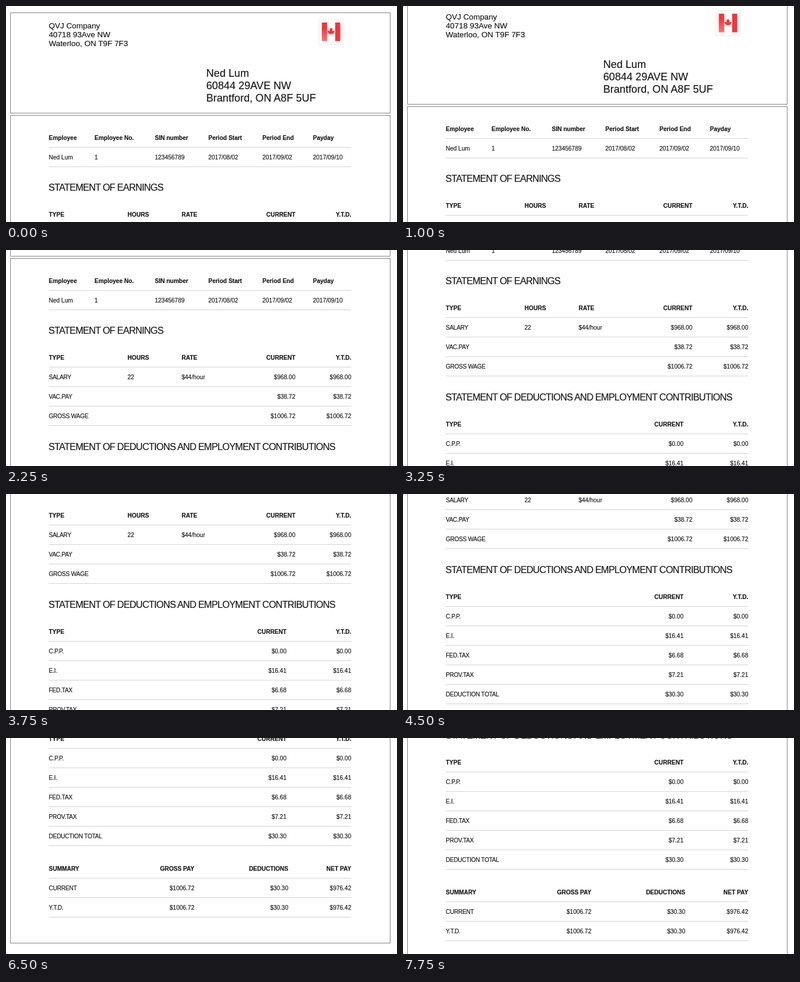
An HTML page that plays this animation: 658x366 px, repeating every 8 s.

```html
<!DOCTYPE html>
<html lang="en">
<head>
<meta charset="utf-8">
<title>Pay stub</title>
<style>
  html, body { margin: 0; width: 100%; height: 100%; overflow: hidden; background: #fff; }
  svg { display: block; width: 658px; height: 366px; }
  text {
    font: 10px "Liberation Sans", Arial, sans-serif; white-space: pre;
    fill: #151515; stroke: #151515; stroke-width: .15px;
  }
  .bold { font-weight: bold; }
  .label { letter-spacing: -.25px; }
  .title { font-size: 16px; letter-spacing: -.75px; }
  .sender { font-size: 13.25px; }
  .receiver { font-size: 17.75px; }
  .box { fill: none; stroke: #858585; }
  .rule { fill: #d4d4d4; }
  .stamp { fill: #fdfdfd; stroke: #dedede; stroke-dasharray: 2 1.5; }
  .red { fill: #f8343a; }
  .faded { fill: url(#fade); }
</style>
</head>
<body>
<svg viewBox="0 0 658 366">
  <linearGradient id="fade" x2="0" y2="1">
    <stop offset=".3" stop-color="#f8343a"/>
    <stop offset="1" stop-color="#fd7474"/>
  </linearGradient>
  <g id="page"></g>
</svg>
<script>
const page = document.getElementById('page');
const LEFT = 72, RIGHT = 581, ROW = 33;

function add(tag, attrs, content = '') {
  const node = document.createElementNS('http://www.w3.org/2000/svg', tag);
  for (const key in attrs) node.setAttribute(key, attrs[key]);
  node.textContent = content;
  page.append(node);
}

const rect = (cls, x, y, width, height) => add('rect', { class: cls, x, y, width, height });

// Negative x marks a column that is aligned to its right edge.
function text(content, x, y, cls) {
  add('text', { class: cls, x: Math.abs(x), y, 'text-anchor': x < 0 ? 'end' : 'start' }, content);
}

const lines = (list, x, y, step, cls) => list.forEach((s, i) => text(s, x, y + i * step, cls));

// y is the rule under the header row; returns the rule under the last row.
function table(y, columns, rows) {
  rows.forEach((row, r) => {
    row.forEach((cell, c) => {
      const cls = r === 0 ? 'bold' : /^[A-Z. ]+$/.test(cell) ? 'label' : '';
      text(cell, columns[c], y + r * ROW - 12, cls);
    });
    rect('rule', LEFT, y + r * ROW, RIGHT - LEFT, 1);
  });
  return y + (rows.length - 1) * ROW;
}

// A heading and its table, placed below the rule at y.
function section(title, y, columns, rows) {
  text(title, LEFT - .5, y + 41.5, 'title');
  return table(y + 97.5, columns, rows);
}

function stamp() {
  rect('stamp', 526.5, 22.5, 41, 43);
  rect('faded', 531.5, 28, 9, 31.5);
  rect('red', 554, 28, 8.5, 31.5);
  const half = [[0, -6], [2.5, -4], [2.4, -.5], [5.8, -1.2], [5.8, 1.2], [2.8, 4.4], [.4, 4.2], [.4, 6.5]];
  const mirrored = half.map(([x, y]) => [-x, y]).reverse();
  add('polygon', { class: 'red', transform: 'translate(547 43)', points: [...half, ...mirrored].join(' ') });
}

const money = value => '$' + value.toFixed(2);
const twice = value => [money(value), money(value)];

const hours = 22, rate = 44;
const salary = hours * rate, vacation = salary * .04, gross = salary + vacation;
const deductions = { 'C.P.P.': 0, 'E.I.': 16.41, 'FED.TAX': 6.68, 'PROV.TAX': 7.21 };
const deducted = Object.values(deductions).reduce((sum, value) => sum + value);
const summary = [gross, deducted, gross - deducted].map(money);

rect('box', 7.5, 11.5, 639, 170);
rect('box', 7.5, 185.5, 639, 711);
stamp();
lines(['QVJ Company', '40718 93Ave NW', 'Waterloo, ON T9F 7F3'], LEFT, 38, 15, 'sender');
lines(['Ned Lum', '60844 29AVE NW', 'Brantford, ON A8F 5UF'], 337, 120, 21, 'receiver');

let y = table(239, [LEFT, 149, 250.5, 340.5, 431.5, 516.5], [
  ['Employee', 'Employee No.', 'SIN number', 'Period Start', 'Period End', 'Payday'],
  ['Ned Lum', '1', '123456789', '2017/08/02', '2017/09/02', '2017/09/10'],
]);

y = section('STATEMENT OF EARNINGS', y - .5, [LEFT, 204.5, 295.5, -487, -RIGHT], [
  ['TYPE', 'HOURS', 'RATE', 'CURRENT', 'Y.T.D.'],
  ['SALARY', hours, `$${rate}/hour`, ...twice(salary)],
  ['VAC.PAY', '', '', ...twice(vacation)],
  ['GROSS WAGE', '', '', ...twice(gross)],
]);

y = section('STATEMENT OF DEDUCTIONS AND EMPLOYMENT CONTRIBUTIONS', y + .5, [LEFT, -472, -RIGHT], [
  ['TYPE', 'CURRENT', 'Y.T.D.'],
  ...Object.entries(deductions).map(([name, value]) => [name, ...twice(value)]),
  ['DEDUCTION TOTAL', ...twice(deducted)],
]);

table(y + 55, [LEFT, -317, -475, -RIGHT], [
  ['SUMMARY', 'GROSS PAY', 'DEDUCTIONS', 'NET PAY'],
  ['CURRENT', ...summary],
  ['Y.T.D.', ...summary],
]);

// Steady scroll gestures: start ms, end ms, distance in px.
const LOOP = 8000, STEP = 250;
const glides = [
  [880, 2480, 200],
  [2810, 3940, 141],
  [4250, 4500, 35],
  [4500, 5450, 119],
  [5750, 6350, 54],
  [7250, 7750, -40],
];

function scrollAt(time) {
  const progress = (from, to) => Math.min(1, Math.max(0, (time - from) / (to - from)));
  return Math.round(glides.reduce((sum, [from, to, px]) => sum + px * progress(from, to), 0));
}

const start = performance.now();
function draw() {
  const time = (performance.now() - start) % LOOP;
  page.setAttribute('transform', `translate(0 ${-scrollAt(time - time % STEP)})`);
  requestAnimationFrame(draw);
}
draw();
</script>
</body>
</html>
```
